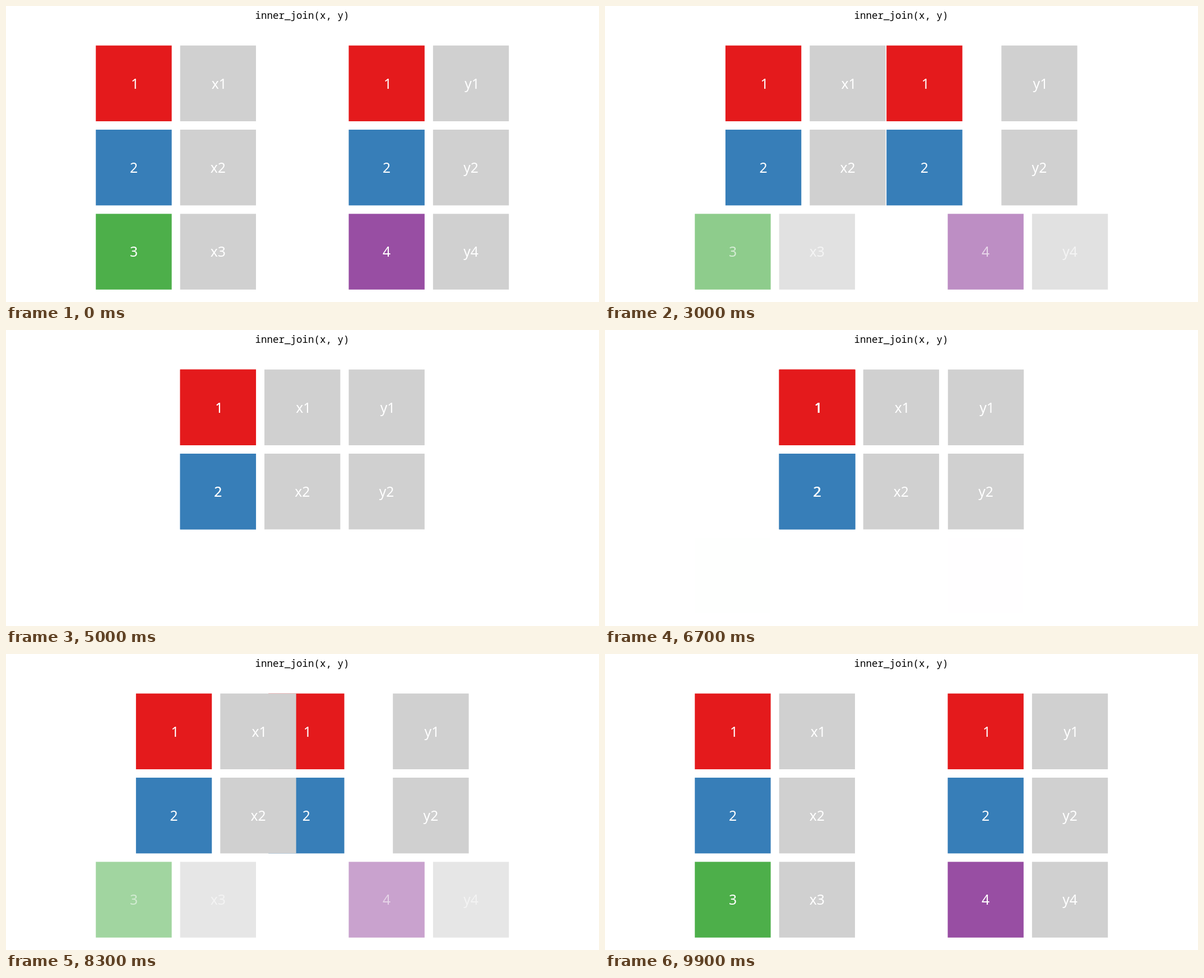
These frames come from a looping animation (1058 by 529 pixels, 10 s). An HTML page:

```html
<!DOCTYPE html>
<html lang="en">
<head>
<meta charset="utf-8">
<title>Inner join</title>
<style>
  html, body { margin: 0; width: 100%; height: 100%; overflow: hidden; background: #fff; }
  svg { display: block; width: 100%; height: 100%; }
  text { text-anchor: middle; }
  .title { font: 17.5px "Noto Sans Mono", monospace; }
  .label { font: 24.7px "Noto Sans", sans-serif; fill: #fff; }
</style>
</head>
<body>
<svg viewBox="0 0 1058 529">
  <text class="title" x="528.5" y="22.5">inner_join(x, y)</text>
  <g id="tiles"></g>
  <g id="labels"></g>
</svg>
<script>
const LOOP = 10000, STEP = 100;
const UNIT = 150.4, TILE = UNIT * 0.9;
const CENTER_X = 528.75, FIRST_ROW_Y = 138.3;
const RED = '#e41a1c', BLUE = '#377eb8', GREEN = '#4daf4a', PURPLE = '#984ea3', GRAY = '#d0d0d0';

// Columns count from the middle of the stage; a cell without `to` fades out in place.
const cells = [
  { label: '1', color: RED, row: 0, from: 1, to: -1 },
  { label: '2', color: BLUE, row: 1, from: 1, to: -1 },
  { label: '4', color: PURPLE, row: 2, from: 1 },
  { label: '1', color: RED, row: 0, from: -2, to: -1 },
  { label: '2', color: BLUE, row: 1, from: -2, to: -1 },
  { label: '3', color: GREEN, row: 2, from: -2 },
  { label: 'x1', color: GRAY, row: 0, from: -1, to: 0 },
  { label: 'x2', color: GRAY, row: 1, from: -1, to: 0 },
  { label: 'x3', color: GRAY, row: 2, from: -1 },
  { label: 'y1', color: GRAY, row: 0, from: 2, to: 1 },
  { label: 'y2', color: GRAY, row: 1, from: 2, to: 1 },
  { label: 'y4', color: GRAY, row: 2, from: 2 }
];

function add(parentId, tag, attributes) {
  const node = document.createElementNS('http://www.w3.org/2000/svg', tag);
  for (const name in attributes) node.setAttribute(name, attributes[name]);
  return document.getElementById(parentId).appendChild(node);
}

for (const cell of cells) {
  const y = FIRST_ROW_Y + cell.row * UNIT;
  cell.tile = add('tiles', 'rect', { y: y - TILE / 2, width: TILE, height: TILE, fill: cell.color });
  cell.text = add('labels', 'text', { class: 'label', y: y + 9.2 });
  cell.text.textContent = cell.label;
  // The digit 1 sits left of its advance box's middle.
  cell.nudge = cell.label.endsWith('1') ? 2 : 0;
}

function sineInOut(time, start, end) {
  const t = Math.min(1, Math.max(0, (time - start) / (end - start)));
  return (1 - Math.cos(Math.PI * t)) / 2;
}

function draw(now) {
  const time = Math.floor((now % LOOP) / STEP) * STEP;
  const joined = sineInOut(time, 1600, 5000) - sineInOut(time, 6600, 9900);
  for (const { tile, text, from, to, nudge } of cells) {
    const fades = to === undefined;
    const x = CENTER_X + UNIT * (fades ? from : from + (to - from) * joined);
    tile.setAttribute('x', x - TILE / 2);
    text.setAttribute('x', x + nudge);
    if (fades) {
      tile.setAttribute('opacity', 1 - joined);
      text.setAttribute('opacity', 1 - joined);
    }
  }
  requestAnimationFrame(draw);
}

draw(performance.now());
</script>
</body>
</html>
```
